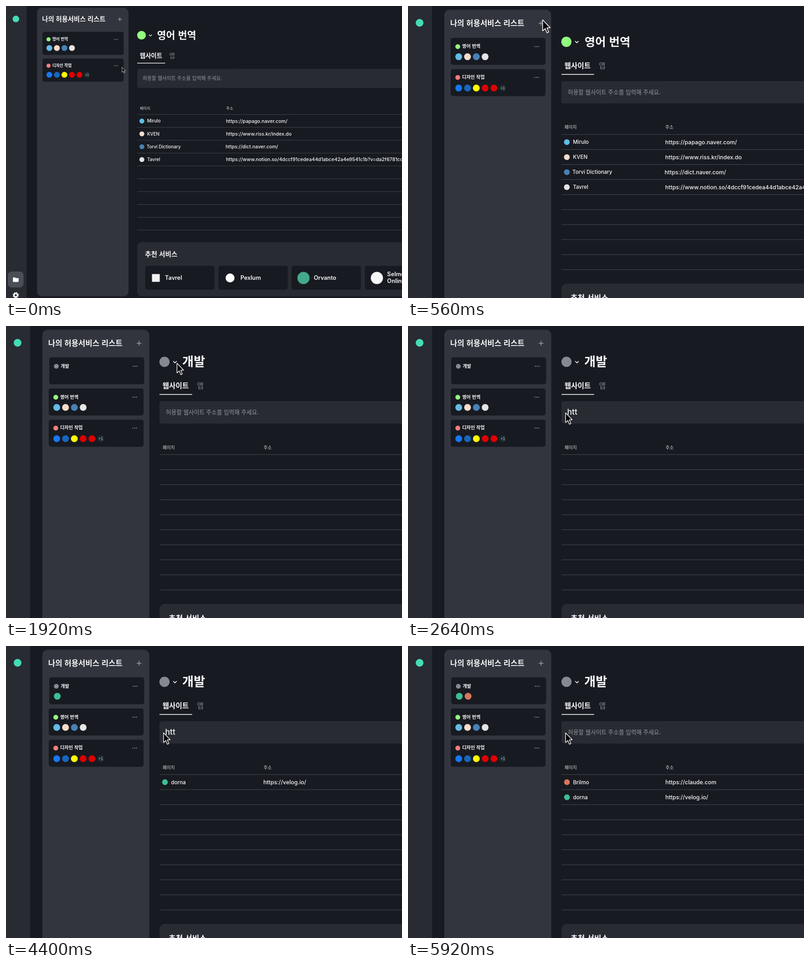
An HTML page for the animation above (6000 ms loop, 872 by 642 pixels).

```html
<!DOCTYPE html>
<html lang="ko">
<head>
<meta charset="utf-8">
<style>
html, body { margin: 0; width: 100%; height: 100%; overflow: hidden; background: #181a21; }
svg { display: block; }
text { font-family: 'Noto Sans CJK KR', 'Noto Sans CJK JP', sans-serif; white-space: pre; }
text.latin { font-family: Inter, 'Noto Sans CJK KR', sans-serif; }
</style>
</head>
<body>
<svg width="872" height="642">
  <g id="scene"></g>
  <path id="cursor" d="M0 0V.83L.19 .66L.33 .98L.46 .92L.32 .61L.57 .59Z" fill="#000" stroke="#fff" stroke-width=".055" stroke-linejoin="round"/>
</svg>
<script>
const LOOP = 6000, CLICK = 760, SUBMIT_A = 3400, SUBMIT_B = 5250;
const BG = '#181a21', BAR = '#282b32', PANEL = '#32353d', WHITE = '#f6f7f8', GREY = '#858991', GREEN = '#92fb80';
const LINE_TOP = 282.7, LINE_STEP = 33.05;
const ZOOM = 1.1697, LIFT = 3.1;
const TITLE_STEPS = ['', 'ㄱ', '개', '갭', '개바', '개발'];
const WORK_ICONS = ['#1877f2', '#1767bd', '#fffb00', '#e00000', '#e00000'];

const SITES = [
  { name: 'Mirulo', url: 'https://papago.naver.com/', color: '#62bbe5' },
  { name: 'KVEN', url: 'https://www.riss.kr/index.do', color: '#f5ddca' },
  { name: 'Torvi Dictionary', url: 'https://dict.naver.com/', color: '#4682b5', dx: -1.2 },
  { name: 'Tavrel', url: 'https://www.notion.so/4dccf91cedea44d1abce42a4e9541c1b?v=da2f6781cc', color: '#e4e4e5' }
];
const BLOG = { name: 'dorna', url: 'https://velog.io/', color: '#3cbf94' };
const CHAT = { name: 'Brilmo', url: 'https://claude.com', color: '#d9765a' };

// time, x, y, size of the pointer
const POINTER = [
  [0, 255.5, 134.5, 13.5], [320, 298.5, 37, 19.5], [560, 296.5, 30.5, 29], [CLICK, 296.5, 30.5, 29],
  [1180, 376.5, 82, 25.5], [1920, 376.5, 82, 25.5], [2350, 347, 191, 25.5], [LOOP, 347, 191, 25.5]
];

const scene = document.getElementById('scene');
const cursor = document.getElementById('cursor');

const rect = (x, y, w, h, fill, r = 0) => `<rect x="${x}" y="${y}" width="${w}" height="${h}" rx="${r}" fill="${fill}"/>`;
const dot = (x, y, r, fill) => `<circle cx="${x}" cy="${y}" r="${r}" fill="${fill}"/>`;
const stroke = (d, color, width) => `<path d="${d}" fill="none" stroke="${color}" stroke-width="${width}"/>`;
// y is the vertical middle of the letters
const text = (s, x, y, size, fill = WHITE, weight = 700, extra = '') =>
  `<text x="${x}" y="${y + size * .36}" font-size="${size}" font-weight="${weight}" fill="${fill}" ${extra}>${s}</text>`;
const latin = (s, x, y, size, weight = 500) => text(s, x, y, size, WHITE, weight, 'class="latin"');

function card(x, y, color, label, icons, shift, more = '') {
  let out = rect(x, y, 209, 59.5, BG, 5) + dot(x + 15.6, y + shift, 5.3, color) + label;
  for (let i = -1; i < 2; i++) out += dot(x + 189.5 + i * 4, y + shift, 1, '#b4b6ba');
  icons.forEach((c, i) => out += dot(x + 17.7 + i * 19.4, y + 41.7, 7.5, c));
  return out + more;
}

function sidebar(s) {
  let out = rect(0, 0, 53, 780, BAR) + dot(25.5, 37, 8.5, '#45dcb6')
    + rect(4.7, 686.5, 40.5, 41, '#4a4e57', 10)
    + '<path d="M17.8 703q0-1.5 1.5-1.5h4l2 2h5.7q1.5 0 1.5 1.5v6.700q0 1.500-1.500 1.500h-11.700q-1.500 0-1.500-1.500z" fill="#fff"/>'
    + '<circle cx="25.1" cy="747.3" r="4.5" fill="none" stroke="#fff" stroke-width="3.5"/>'
    + '<circle cx="25.1" cy="747.3" r="6.6" fill="none" stroke="#fff" stroke-width="2.2" stroke-dasharray="3 2.18"/>'
    + rect(80, 8.3, 235.5, 742, PANEL, 12)
    + text('나의 허용서비스 리스트', 93, 37.9, 16.75)
    + stroke('M287.8 38h10.4M293 32.8v10.4', '#9b9ea4', 1.5);
  if (s.added) {
    const label = s.title
      ? text(s.title, 120.5, 88, 10.2)
      : text('허용서비스 세트의 이름을', 120.5, 88, 9.9, GREY, 500) + text('입력해주세요.', 120.5, 102.5, 9.9, GREY, 500);
    out += card(95.2, 68.8, GREY, label, s.sites.map(v => v.color).reverse(), 19.7);
  }
  const top = s.added ? 137.3 : 70, next = s.added ? 206 : 138.8;
  const plus = dot(208.7, next + 41.7, 7.5, '#1d2c30') + text('+1', 208.7, next + 41.7, 8.8, '#c3d2cf', 500, 'text-anchor="middle"');
  return out
    + card(94, top, GREEN, text('영어 번역', 119.2, top + 18.9, 10.2), SITES.map(v => v.color), 19.3)
    + card(94, next, '#f77c7c', text('디자인 작업', 119.2, next + 17.7, 10.2), WORK_ICONS, 18.4, plus);
}

function service(i, icon, label, x) {
  const left = 358.5 + i * 188.6;
  const lines = label.length > 1 ? [693.6, 711.2] : [703];
  return rect(left, 671.7, 178.5, 61.5, BG, 5) + icon(left)
    + label.map((s, n) => latin(s, left + x, lines[n], 14.9, 600)).join('');
}

function main(s) {
  let out = dot(349, 78.8, 11.2, s.added ? GREY : GREEN) + stroke('M368.2 77.2l3.8 3.8 3.8-3.8', '#fff', 1.6);
  if (!s.added) out += text('영어 번역', 389, 78.5, 25.5);
  else if (s.title) out += text(s.title, 388, 78.5, 27.5);
  else out += text('허용서비스 리스트의 이름을 입력해주세요.', 389, 78.5, 25.5, '#7d8188');

  out += text('웹사이트', 344.5, 131.6, 15.8) + text('앱', 420.5, 131.6, 15.8, GREY, 500)
    + rect(338, 149.7, 72, 1.6, '#fff')
    + rect(338, 165.3, 900, 49.2, BAR, 5)
    + (s.input ? latin(s.input, 350.5, 189, 17.5) : text('허용할 웹사이트 주소를 입력해 주세요.', 352, 189.8, 12.7, '#94979d', 400))
    + text('페이지', 344.7, 267, 9.8, '#dfe0e2', 500) + text('주소', 567, 267, 9.8, '#dfe0e2', 500);

  for (let i = 0; i < 10; i++) out += rect(338, LINE_TOP + i * LINE_STEP - .5, 900, 1, '#484b52');
  s.sites.forEach((v, i) => {
    const y = 299.4 + i * LINE_STEP, dx = v.dx || 0;
    out += dot(350, y, 6.3, v.color) + latin(v.name, 363.5 + dx, y, 11.6) + latin(v.url, 566.7 + dx, y, 12.4);
  });

  return out + rect(338, 611, 900, 139.3, BAR, 12) + text('추천 서비스', 358, 642.5, 17.1)
    + service(0, x => rect(x + 17.5, 693, 20, 20, '#f2f2f2'), ['Tavrel'], 51)
    + service(1, x => dot(x + 30, 703, 11.5, '#fff'), ['Pexlum'], 56.7)
    + service(2, x => dot(x + 30.5, 703, 15.7, '#43a98c'), ['Orvanto'], 57)
    + service(3, x => dot(x + 31, 703, 15.7, '#f4f6f8'), ['Selmoram', 'Online'], 57.5);
}

const clamp = v => Math.max(0, Math.min(1, v));
const easeCubic = u => u < .5 ? 4 * u ** 3 : 1 - 4 * (1 - u) ** 3;
const smooth = u => u * u * (3 - 2 * u);
const typed = (s, t, start) => s.slice(0, Math.max(0, Math.floor((t - start) / 43)));

function stateAt(t) {
  const added = t >= CLICK;
  const step = Math.floor((t - 1340) / 100);
  const title = added ? TITLE_STEPS[Math.max(0, Math.min(5, step))] : '';
  let input = '', sites = SITES;
  if (added) {
    sites = t >= SUBMIT_B ? [CHAT, BLOG] : t >= SUBMIT_A ? [BLOG] : [];
    if (t < SUBMIT_A) input = typed(BLOG.url, t, 2500);
    else if (t < SUBMIT_B) input = typed(CHAT.url, t, 4260);
  }
  return { added, title, input, sites };
}

let shown = '';
function draw() {
  const t = performance.now() % LOOP;
  const state = stateAt(t), key = JSON.stringify(state);
  if (key !== shown) {
    scene.innerHTML = sidebar(state) + main(state);
    shown = key;
  }
  const p = easeCubic(clamp((t - 50) / 571));
  scene.setAttribute('transform', `translate(0 ${-LIFT * (1 - p)}) scale(${(1 + (ZOOM - 1) * p) / ZOOM})`);

  const i = POINTER.findIndex(k => k[0] > t);
  const a = POINTER[i - 1], b = POINTER[i];
  const u = smooth((t - a[0]) / (b[0] - a[0]));
  const [x, y, size] = [1, 2, 3].map(n => a[n] + (b[n] - a[n]) * u);
  cursor.setAttribute('transform', `translate(${x} ${y}) scale(${size})`);
  requestAnimationFrame(draw);
}
draw();
</script>
</body>
</html>
```
